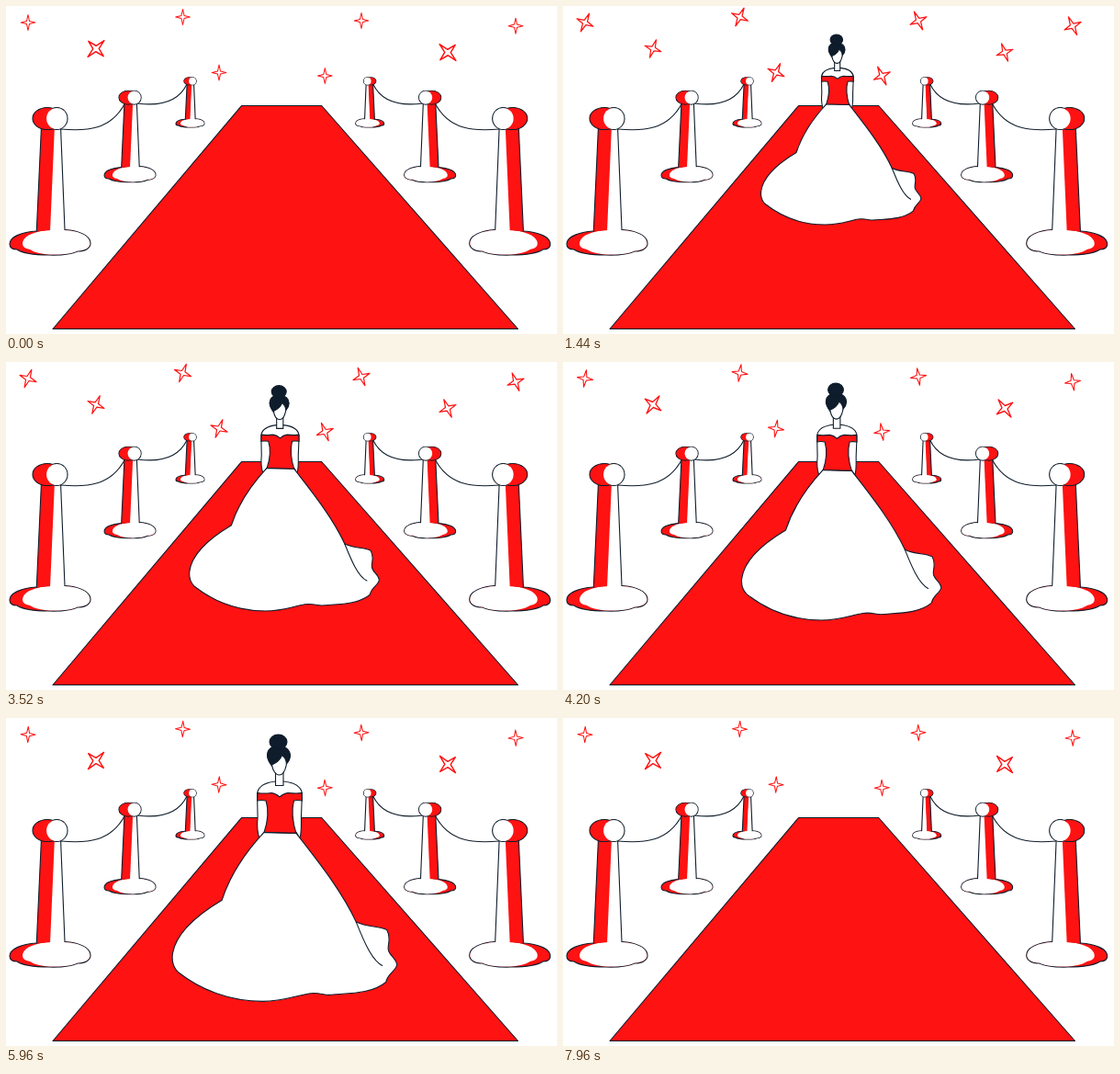
These frames come from a looping animation (600 by 357 pixels, 8000 ms). An HTML page:

```html
<!DOCTYPE html>
<html lang="en">
<head>
<meta charset="utf-8">
<title>Red carpet</title>
<style>
  html, body { margin: 0; width: 100%; height: 100%; overflow: hidden; background: #fff; }
  svg { display: block; width: 100vw; height: 100vh; }
  .line { stroke: #0f1c2b; stroke-width: 1.1; stroke-linejoin: round; stroke-linecap: round; }
  .line, .line * { vector-effect: non-scaling-stroke; }
  .red { fill: #ff1212; }
  .white { fill: #fff; }
  .dark { fill: #0f1c2b; }
  .none { fill: none; }
  .star { fill: #fff; stroke: #ff1212; stroke-width: 1; stroke-linejoin: round; }
</style>
</head>
<body>
<svg viewBox="0 0 600 357">
  <defs>
    <g id="post">
      <path class="line red" d="M33 245C18 246 4 251 4 259C4 263 7 265 12 265C18 269 30 271 46 271C62 271.500 72 270 78 267C87 267 92 263 92 258.500C92 250 80 244.500 64 243.500Z"/>
      <path class="white" d="M48 243.500C30 245 18 251 18 258.500C18 263 22 264 26 265C32 269 40 270 48 270.400C62 270.800 72 269.500 78 266.400C86 266.400 91.400 263 91.400 258.500C91.400 250 80 245 64 244Z"/>
      <path class="red" d="M38.500 130L33.300 245.500L49 244L54 130Z"/>
      <path class="white" d="M53 130L48 246H64L59.500 130Z"/>
      <path class="line none" d="M38.500 131L33.300 245M59.500 131L64 243.500"/>
      <!-- knob: outlines first, so only the outer contour stays visible -->
      <g class="line">
        <ellipse cx="45" cy="122.500" rx="16" ry="12"/>
        <ellipse cx="55.300" cy="122.500" rx="11.700" ry="12"/>
      </g>
      <ellipse class="red" cx="45" cy="122.500" rx="15.500" ry="11.500"/>
      <ellipse class="white" cx="55.300" cy="122.500" rx="11.200" ry="11.500"/>
    </g>
    <g id="barrier">
      <path class="line none" d="M59.500 134C88 136.500 114 135 129.500 106M143 106C166 109 187 106 197 85"/>
      <use href="#post"/>
      <use href="#post" transform="translate(104.500 23.700) scale(.636 .62)"/>
      <use href="#post" transform="translate(183.600 40.300) scale(.352 .3385)"/>
    </g>
  </defs>

  <rect class="white" width="600" height="357"/>
  <path class="line red" d="M256.500 108.500H343.700L557.500 351.500H51Z"/>
  <use href="#barrier"/>
  <use href="#barrier" transform="translate(596.700) scale(-1 1)"/>
  <g id="stars"></g>

  <g id="lady" class="line">
    <!-- arms and shoulders -->
    <path class="white" d="M293.500 69C284 70 275 73 273.500 82L274 108C273 118 274 126 276 131L281 124.500H316L320 131C322 125 321.500 115 321.500 108L322.500 82C321 73 312 70 302 69Z"/>
    <!-- gown -->
    <path class="white" d="M281 124.500C259 148 243 174 235 198.500C209 214 184 235 181 258C180 267 183 273 187 277C211 296 243 309 279 309C302 309 315 303 330 300.500C340 299 345 302 352 302C375 300 398 301 414 288C416 278 425 276 426 269C425 261 417 259 416.500 252C416 245 420 240 415 231C405 226 395 229 381.500 222.500C365 187 338 154 316 125.500Z"/>
    <path class="none" d="M381.500 222.500C389 241 398 264 410 270"/>
    <!-- bodice -->
    <path class="red" d="M274 81.500C280 82.500 285 82 289 81.500C293 82 296 84 298 86C300 84 303 82 307 81.500C312 82 317 82.500 322 81.500L322.500 90C319 89.500 316 89.500 313.500 90C311 100 312 113 316 125.500L281 124.500C285 113 286 100 283 90C280 89.500 276 89.500 273.500 90Z"/>
    <!-- head -->
    <path class="dark" d="M284.500 40C285 33 290 30.500 297 30.500C305 30.500 309.500 35 309.500 41C309.500 46 307 48 304.500 51L290 53C287 49 284 45 284.500 40Z"/>
    <ellipse class="dark" cx="296.500" cy="26" rx="9.500" ry="8"/>
    <path class="white" d="M293.500 58V73.500H302V58Z"/>
    <path class="white" d="M300.500 40.500C304 43 305.800 46 305.300 51C304 57 301 62 297.500 62C293.500 62 290.500 57 289.500 51C294 49 298.500 46 300.500 40.500Z"/>
  </g>
</svg>
<script>
  const LOOP = 8000, GROW = 6000, FADE = 1000, SWING = 1000;
  const STEP = 1000, BOB = 1.1;
  const PIVOT = { x: 301, y: 59.6 };
  // [x, y, starts large]
  const SPOTS = [
    [24, 18], [192.5, 12], [387, 16], [555, 21.7], [232, 72.5], [347.3, 76],
    [98, 46.5, true], [481, 50.5, true]
  ];
  const STAR = "M0-8.500L1.500-1.600L7.800 0L1.500 1.600L0 8.500L-1.500 1.600L-7.800 0L-1.500-1.600Z";

  const lady = document.getElementById("lady");
  const sky = document.getElementById("stars");
  const clamp = v => Math.max(0, Math.min(1, v));

  const stars = SPOTS.map(([x, y, large]) => {
    const node = document.createElementNS("http://www.w3.org/2000/svg", "path");
    node.setAttribute("d", STAR);
    node.setAttribute("class", "star");
    sky.append(node);
    return { node, x, y, large, turn: x < 300 ? 45 : -45 };
  });

  function draw(t) {
    const swing = 1 - Math.abs(1 - (t % (2 * SWING)) / SWING);
    for (const { node, x, y, large, turn } of stars) {
      const k = large ? 1 - swing : swing;
      node.setAttribute("transform",
        `translate(${x} ${y}) rotate(${turn * k}) scale(${1 + 0.48 * k})`);
    }

    const scale = 0.62 + 0.38 * clamp(t / GROW);
    const bob = t < GROW ? BOB * Math.sin(Math.PI * t / STEP) ** 2 : 0;
    lady.setAttribute("transform",
      `translate(${PIVOT.x} ${PIVOT.y + bob}) scale(${scale}) translate(${-PIVOT.x} ${-PIVOT.y})`);
    lady.setAttribute("opacity", Math.min(clamp(t / FADE), 1 - clamp((t - GROW) / FADE)));
  }

  const start = performance.now();
  function tick() {
    draw((performance.now() - start) % LOOP);
    requestAnimationFrame(tick);
  }
  draw(0);
  requestAnimationFrame(tick);
</script>
</body>
</html>
```
